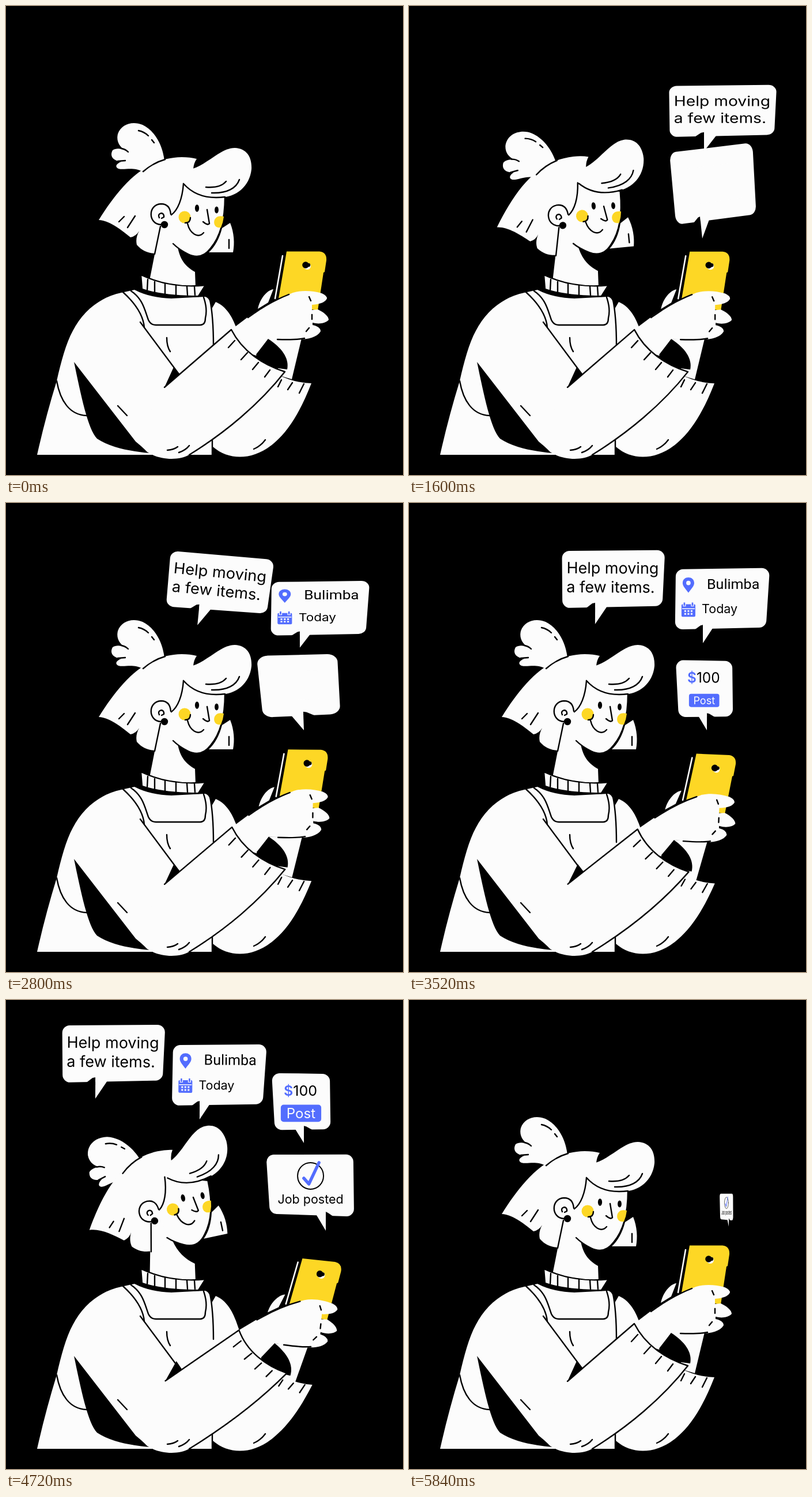
An HTML page that plays this animation: 689 px wide and 813 px high, repeating every 5.92 s.

```html
<!DOCTYPE html>
<html lang="en">
<head>
<meta charset="utf-8">
<title>Posting a job</title>
<style>
  html, body { margin: 0; width: 100%; height: 100%; overflow: hidden; background: #000; }
  svg { display: block; width: 689px; height: 813px; }
  .w { fill: #fcfcfc; }
  .y { fill: #fdd725; }
  .b { fill: #536dfe; }
  .l { fill: none; stroke: #000; stroke-width: 2.4; stroke-linecap: round; stroke-linejoin: round; }
  .w.l { fill: #fcfcfc; }
  .box { fill: #fcfcfc; stroke: #fcfcfc; stroke-width: 26; stroke-linejoin: round; }
  text { font-family: Inter, sans-serif; }
</style>
</head>
<body>
<svg viewBox="0 0 689 813">
  <!-- torso -->
  <path class="w" d="M54,778 Q68,715 88,650 C96,615 104,585 116,563 C133,530 162,505 200,497 L223,492 Q250,506 287,507 L345,504 Q354,505 357,525 L364,513 C383,521 393,540 399,556 L411,590 L357,700 L357,778 Z"/>
  <path d="M118,617 L225,755 L249,775 C215,772 180,765 158,750 C142,733 130,675 118,617 Z"/>
  <path class="l" d="M88,650 C94,684 110,709 140,710 M194,693 L210,710 M233,548 L300,638 M279,575 Q279,590 285,599
    M203,496 C224,515 238,535 240,557 M217,494 C238,508 241,528 247,544 Q251,553 260,553 L337,553 Q346,553 346,541 Q350,525 343,505 M354,509 Q360,540 360,588"/>
  <path class="w" data-part="neck" d="M268,380 L249,476 L329,488 L328,461 C312,452 302,440 298,418 L280,400 Z"/>
  <path class="w l" d="M234,466 C270,483 310,488 346,484 L334,503 C300,504 262,500 236,491 Z"/>
  <path class="l" d="M246,474 L245,493 M258,478 L258,496 M276,482 L276,499 M295,484 L295,501 M314,486 L315,501 M327,486 L328,501"/>

  <g id="head">
    <g id="bun">
      <path class="w" d="M238,288 C222,278 205,285 195,282 C187,278 194,272 200,270 C184,268 180,259 185,250 C192,245 204,247 212,253 C197,246 191,235 194,222 C200,204 220,199 237,206 C260,217 273,245 275,270 L280,290 Z"/>
      <path class="l" d="M200,247 Q207,248 212,253 M194,269 L207,268 M230,216 Q240,218 247,225 M253,232 L257,237"/>
    </g>
    <path class="w" d="M352,427 Q368,412 375,385 L389,376 C396,393 397,412 394,427 Z"/>
    <path class="w" d="M161,371 C198,312 240,263 305,262 Q320,262 331,265 Q326,272 325,282 L345,330 L300,420 L258,429 C245,428 236,424 227,414 C225,405 227,398 231,390 Q226,399 216,401 C200,388 180,372 161,371 Z"/>
    <path class="l" d="M238,287 Q255,272 276,266 M196,374 L205,365 M211,384 L224,364 M387,405 L387,420 M268,382 L258,430"/>
    <path class="w" d="M308,308 L380,331 C380,370 372,400 355,420 C343,436 330,437 316,430 Q300,422 290,412 L285,362 Z"/>
    <path class="l" d="M380,331 C380,370 372,400 355,420 C343,436 330,437 316,430 Q300,422 290,412 M308,308 C306,335 298,354 287,362"/>
    <circle class="y" cx="310" cy="366" r="10.5"/>
    <path class="y" d="M378,365 C357,359 356,387 373,384 Q377,375 378,365 Z"/>
    <ellipse cx="331.5" cy="350.5" rx="3.6" ry="6.3"/>
    <ellipse cx="365.5" cy="353.5" rx="3.4" ry="6"/>
    <path class="l" d="M349,353 L353,377 Q350,381 342,374 M320,367 Q320,376 311,376 M315,377 C319,394 333,404 343,393"/>
    <path class="w l" d="M286,361 C285,349 279,343 269,343 C246,344 246,378 269,379"/>
    <path class="l" d="M266,367 C261,359 275,355 274,366 L270,368"/>
    <circle cx="275" cy="379" r="6.2"/>
    <g id="quiff">
      <path class="w" d="M324,282 C350,274 373,246 397,246 C420,247 427,265 426,283 C423,312 400,332 370,332 C345,332 325,325 308,308 Z"/>
      <path class="l" d="M308,308 C325,327 350,335 380,331 M347,314 Q372,316 382,304 M357,324 C385,325 400,315 405,301"/>
    </g>
  </g>

  <!-- arms and phone -->
  <path class="w" data-part="arm" d="M359,764 L359,690 L470,638 Q498,653 530,654 C512,700 492,735 466,757 C430,788 388,789 359,764 Z"/>
  <path class="l" d="M358,748 L358,780"/>
  <g id="hand">
    <path class="w" d="M455,577 L513,576 L496,647 L476,641 Z"/>
    <path class="w" d="M437,525 C441,505 455,492 464,491 L455,514 Z"/>
    <path d="M478,428 L490,424 L475,510 L460,512 Z"/>
    <path class="y" d="M487,425.500 L544,425.500 Q557,427 556,441 L553,461 L551,462 L541,528 L500,520 L473,507 Z"/>
    <path d="M480,433 L467,507" stroke="#fcfcfc" stroke-width="2.6" stroke-linecap="round"/>
    <circle class="w" cx="523" cy="451" r="6"/><circle cx="520" cy="449" r="5.8"/><circle cx="525" cy="449" r="3.2"/>
    <path class="w" d="M391,561 L424,536 C446,521 480,504 498,497 C515,492 533,494 548,498 Q557,502 557,507 C554,514 544,517 531,518 L531,527 L541,526 C552,531 560,538 560,544 C555,550 543,552 532,549 L532,553 Q546,556 546,564 C540,574 525,578 508,578 L455,577 L434,606 L400,595 Z"/>
    <path class="l" d="M420,540 L430,533 Q460,512 491,500 M471,578 Q505,579 518,576 M526,504 L529,511 M531,535 L531,543 M521,564 L526,558"/>
    <path d="M455,577 C478,592 492,610 488,630 L450,625 L434,604 Z"/>
  </g>
  <path data-part="arm" d="M275,661 L291,626 L301,638 L305,648 Z"/>
  <path class="w" data-part="arm" d="M275,661 L391,561 C410,598 445,622 484,634 C440,690 380,740 318,778 C300,788 268,788 245,773 L222,750 Z"/>
  <path class="l" data-part="arm" d="M275,661 L391,561 C410,598 445,622 484,634 C440,690 380,740 318,778
    M386,592 L397,580 M408,613 L419,601 M428,630 L438,618 M449,643 L458,631 M472,660 L478,648 M489,665 L497,653 M509,671 L517,655
    M280,770 Q292,769 298,764 M300,774 Q312,770 318,762 M430,768 Q442,763 450,752"/>

  <!-- speech bubbles, each with its tail tip at 0,0 -->
  <g class="bubble">
    <path class="box" d="M-45,-114 L107,-116 L104,-45 L-44,-41 Z"/>
    <path d="M-18,-26 L-5,-36 L0,-37 L0,-20 Z"/><path class="w" d="M0,-38 L0,0 L20,-30 Z"/>
    <g class="content" font-size="27"><text x="-50" y="-88">Help moving</text><text x="-50" y="-55">a few items.</text></g>
  </g>
  <g class="bubble">
    <path class="box" d="M-34,-116 L102,-118 L97,-40 L-35,-37 Z"/>
    <path d="M-16,-22 L-4,-31 L0,-32 L0,-17 Z"/><path class="w" d="M0,-34 L0,0 L17,-26 Z"/>
    <g class="content">
      <path class="b" d="M-25,-88 C-31,-96 -35,-100 -35,-105 C-35,-118 -15,-118 -15,-105 C-15,-100 -19,-96 -25,-88 Z"/>
      <circle class="w" cx="-25" cy="-105" r="3.8"/>
      <rect class="b" x="-37" y="-68" width="24" height="22" rx="2"/>
      <path d="M-36,-60 H-14" stroke="#fcfcfc" stroke-width="1.5"/>
      <path d="M-32,-71 V-64 M-18,-71 V-64" stroke="#fcfcfc" stroke-width="5"/>
      <path d="M-32,-71 V-65 M-18,-71 V-65" stroke="#536dfe" stroke-width="2.6"/>
      <path d="M-32,-56 H-18 M-32,-51 H-18" stroke="#fcfcfc" stroke-width="3" stroke-dasharray="3 2.5"/>
      <text x="7" y="-95" font-size="25" style="font-family:Roboto,sans-serif">Bulimba</text>
      <text x="-2" y="-52" font-size="21.5">Today</text>
    </g>
  </g>
  <g class="bubble">
    <path class="box" d="M-42,-109 L32,-108 L33,-37 L-38,-36 Z"/>
    <path d="M16,-22 L4,-29 L0,-30 L0,-17 Z"/><path class="w" d="M0,-32 L0,0 L-16,-26 Z"/>
    <g class="content">
      <text x="-35" y="-83" font-size="25"><tspan class="b" font-weight="600">$</tspan>100</text>
      <g id="post"><rect class="b" x="-35" y="-15" width="70" height="30" rx="5"/><text class="w" y="8.5" font-size="24" text-anchor="middle">Post</text></g>
    </g>
  </g>
  <g class="bubble">
    <path class="box" d="M-92,-119 L36,-119 L37,-38 L-87,-42 Z"/>
    <path d="M16,-23 L4,-31 L0,-33 L0,-18 Z"/><path class="w" d="M0,-35 L0,0 L-17,-28 Z"/>
    <g class="content">
      <circle class="l" cx="-27" cy="-95" r="23" style="stroke-width:2"/>
      <path class="l" d="M-39,-91 L-30,-81 L-12,-118" style="stroke:#536dfe;stroke-width:5.5"/>
      <text x="-27" y="-47" font-size="22" text-anchor="middle">Job posted</text>
    </g>
  </g>
</svg>
<script>
const LOOP = 5920, STEP = 80;
const HOPS = [1120, 2360, 3600];          // every bubble on stage moves on
const SPIN = Math.PI / 240;               // radians of spring swing per ms
const EXIT = 4800, EXIT_GAP = 150, EXIT_TIME = 640;

// Each bubble pops up at its first stop and takes one more per later hop.
const bubbles = [
  { pop: 320, stops: [[512, 404], [512, 245], [323, 210], [155, 171]] },
  { pop: 1490, stops: [[509, 403], [510, 243], [336, 207]] },
  { pop: 2600, stops: [[517, 394], [517, 248]] },
  { pop: 3750, stops: [[555, 400]] }
];

const $ = s => document.querySelector(s), $$ = s => [...document.querySelectorAll(s)];
const clamp = v => Math.max(0, Math.min(1, v));
const ramp = (t, from, to) => { const u = clamp((t - from) / (to - from)); return u * u * (3 - 2 * u); };
const pulse = (t, at, width) => Math.exp(-(((t - at) / width) ** 2));
const place = (el, value) => el.setAttribute('transform', value);

function turn(x, y, cx, cy, degrees) {
  const a = degrees * Math.PI / 180, c = Math.cos(a), s = Math.sin(a);
  return [cx + (x - cx) * c - (y - cy) * s, cy + (x - cx) * s + (y - cy) * c];
}

// Soft parts turn less the nearer they are to their fixed end.
const bends = {
  neck: (x, y, head) => turn(x, y, 285, 462, -12.5 * head * clamp((485 - y) / 55)),
  arm: (x, y, head, arm) => turn(x, y, 293, 691, 7 * arm * clamp((740 - y) / 170))
};
const soft = $$('[data-part]').map(el => ({ el, d: el.getAttribute('d'), bend: bends[el.dataset.part] }));
const groups = $$('.bubble').map(el => ({ el, content: el.querySelector('.content') }));

function bubblePose({ pop, stops }, index, t) {
  let [x, y] = stops[0];
  const age = Math.max(0, t - pop), a = age * SPIN, swing = Math.exp(-.3 * a), grow = 1 - Math.exp(-age / 30);
  let sx = grow * (1 - swing * Math.cos(a));
  let sy = grow * (1 + .35 * swing * Math.sin(a));
  let angle = -9 * swing * Math.sin(a);

  // Spring to the next stop: stretch on the way up, lean on the way sideways.
  stops.slice(1).forEach(([nx, ny], i) => {
    const [px, py] = stops[i], b = Math.max(0, t - HOPS[index + i]) * SPIN;
    const moved = 1 - Math.exp(-.5 * b) * Math.cos(b), wobble = Math.exp(-.3 * b) * Math.sin(.75 * b);
    x += (nx - px) * moved;
    y += (ny - py) * moved;
    const stretch = .7 * wobble * (py - ny) / 160;
    sx *= 1 - .4 * stretch;
    sy *= 1 + stretch;
    angle += wobble * (nx - px) / 5.5;
  });

  // Leave: squash, stretch thin, vanish.
  const v = clamp((t - EXIT - EXIT_GAP * index) / EXIT_TIME);
  y -= 30 * Math.sin(Math.PI * v);
  sx *= 1 - v * v;
  sy *= (1 - .25 * Math.sin(2 * Math.PI * v)) * (1 - v ** 6);
  return { x, y, sx, sy, angle, visible: age > 0 && v < 1 };
}

function draw(t) {
  const head = .45 * (ramp(t, 1360, 1600) - ramp(t, 1680, 2200)) + ramp(t, 3560, 4040) - ramp(t, 4640, 5320);
  const taps = [600, 1850, 2640].reduce((sum, at) => sum + pulse(t, at, 130), 0);
  const arm = .35 * taps + ramp(t, 3200, 3980) - ramp(t, 4600, 5160);
  place($('#head'), `rotate(${-12.5 * head} 285 462)`);
  place($('#bun'), `rotate(${-11.5 * head} 300 277)`);
  place($('#quiff'), `rotate(${-8.5 * head} 330 279)`);
  place($('#hand'), `rotate(${7 * arm} 293 691)`);
  place($('#post'), `translate(-5 -52) scale(${1 - .23 * pulse(t, 3520, 160)})`);
  for (const { el, d, bend } of soft)
    el.setAttribute('d', d.replace(/([\d.]+),([\d.]+)/g, (_, x, y) => bend(+x, +y, head, arm).join()));
  groups.forEach(({ el, content }, i) => {
    const p = bubblePose(bubbles[i], i, t);
    el.style.display = p.visible ? '' : 'none';
    place(el, `translate(${p.x} ${p.y}) rotate(${p.angle}) scale(${p.sx} ${p.sy})`);
    place(content, `translate(0 -75) scale(${ramp(t, bubbles[i].pop + 360, bubbles[i].pop + 600)}) translate(0 75)`);
  });
}

const start = performance.now();
let shown = -1;
function tick() {
  const t = Math.floor((performance.now() - start) % LOOP / STEP) * STEP;
  if (t !== shown) draw(shown = t);
  requestAnimationFrame(tick);
}
tick();
</script>
</body>
</html>
```
